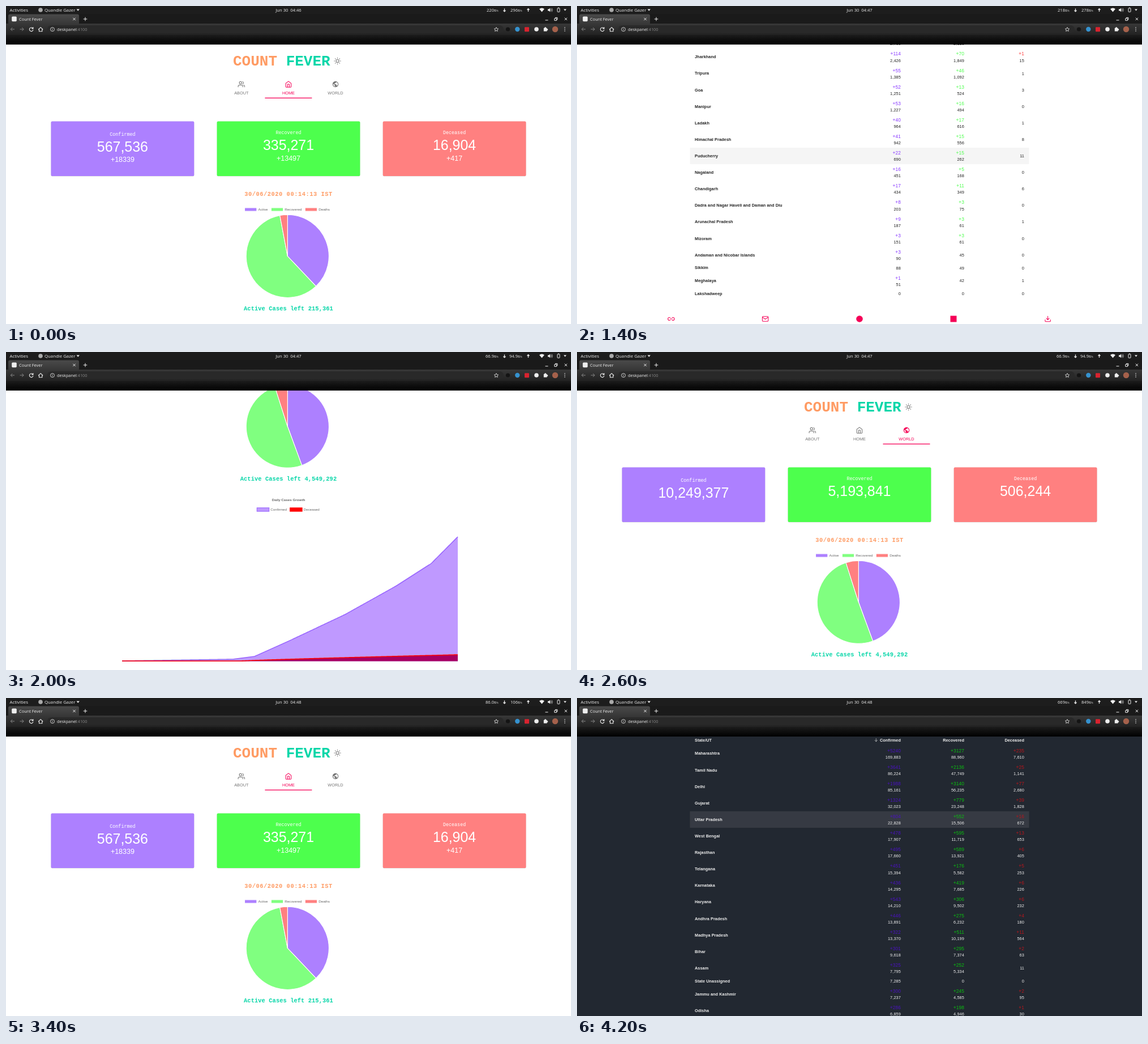
Write an HTML page that moves like this. It is 998 px wide and 561 px high and loops after 4.4 s.

```html
<!DOCTYPE html>
<html lang="en">
<head>
<meta charset="utf-8">
<title>Count Fever</title>
<style>
  html, body { margin: 0; width: 100%; height: 100%; overflow: hidden; background: #fff; }
  svg { display: block; width: 998px; height: 561px; }
  text { white-space: pre; }
  .sans { font-family: "Liberation Sans", Arial, sans-serif; }
  .mono { font-family: "Liberation Mono", monospace; }
  .ui { font-family: "Open Sans", "Noto Sans", sans-serif; }
  .b { font-weight: 700; }
  .body { letter-spacing: .08px; }
  .date { letter-spacing: .52px; }
</style>
</head>
<body>
<svg id="stage" viewBox="0 0 998 561"></svg>
<script>
const STEP = 200, STEPS = 22;
const PINK = '#f50057', ORANGE = '#ff9b63', TEAL = '#06d6a8', GREY = '#666';
const LABELS = ['Confirmed', 'Recovered', 'Deceased'];

const LIGHT = {
  bg: '#fff', ink: '#222', tab: '#757575', hover: '#f5f5f5',
  card: ['#ad80ff', '#4dff4d', '#ff8080'], pie: ['#ad80ff', '#80ff80', '#ff8080'],
  delta: ['#8a3cff', '#4dff4d', '#ff4545'], key: ['#ad80ff', '#80ff80', '#ff8080']
};
const DARK = {
  bg: '#222831', ink: '#eee', tab: '#999', hover: '#363a43',
  card: ['#3d1399', '#0bc00f', '#8f1518'], pie: ['#3d1399', '#12a016', '#a31418'],
  delta: ['#4a12c0', '#0bc010', '#b8161c'], key: ['#3d1399', '#0bb00f', '#a31418']
};

const ICON = {
  users: 'M17 21v-2a4 4 0 0 0-4-4H5a4 4 0 0 0-4 4v2M23 21v-2a4 4 0 0 0-3-3.87M16 3.13a4 4 0 0 1 0 7.75M5 7a4 4 0 1 0 8 0a4 4 0 1 0-8 0',
  home: 'M3 9l9-7 9 7v11a2 2 0 0 1-2 2H5a2 2 0 0 1-2-2zM9 22V12h6v10',
  link: 'M15 7h3a5 5 0 0 1 0 10h-3m-6 0H6a5 5 0 0 1 0-10h3M8 12h8',
  mail: 'M4 4h16a2 2 0 0 1 2 2v12a2 2 0 0 1-2 2H4a2 2 0 0 1-2-2V6a2 2 0 0 1 2-2zM22 6l-10 7L2 6',
  save: 'M21 15v4a2 2 0 0 1-2 2H5a2 2 0 0 1-2-2v-4M7 10l5 5 5-5M12 15V3',
  sun: 'M7 12a5 5 0 1 0 10 0a5 5 0 1 0-10 0M12 1v2M12 21v2M4.2 4.2l1.4 1.4M18.4 18.4l1.4 1.4M1 12h2M21 12h2M4.2 19.8l1.4-1.4M18.4 5.6l1.4-1.4',
  down: 'M12 4v16M5 13l7 7 7-7',
  globe: 'M12 2C6.48 2 2 6.48 2 12s4.48 10 10 10 10-4.48 10-10S17.52 2 12 2zm-1 17.93c-3.95-.49-7-3.85-7-7.93 0-.62.08-1.21.21-1.79L9 15v1c0 1.1.9 2 2 2v1.93zm6.9-2.54c-.26-.81-1-1.39-1.9-1.39h-1v-3c0-.55-.45-1-1-1H8v-2h2c.55 0 1-.45 1-1V7h2c1.1 0 2-.9 2-2v-.41c2.93 1.19 5 4.06 5 7.41 0 2.08-.8 3.97-2.1 5.39z'
};

// A star marks a row with no news today
const STATES = `Maharashtra 169,883 88,960 7,610
Tamil Nadu 86,224 47,749 1,141
Delhi 85,161 56,235 2,680
Gujarat 32,023 23,248 1,828
Uttar Pradesh 22,828 15,506 672
West Bengal 17,907 11,719 653
Rajasthan 17,660 13,921 405
Telangana 15,394 5,582 253
Karnataka 14,295 7,685 226
Haryana 14,210 9,502 232
Andhra Pradesh 13,891 6,232 180
Madhya Pradesh 13,370 10,199 564
Bihar 9,618 7,374 63
Assam 7,795 5,334 11
*State Unassigned 7,285 0 0
Jammu and Kashmir 7,237 4,585 95
Odisha 6,859 4,946 30
Punjab 5,418 3,764 138
Kerala 4,190 2,150 24
Uttarakhand 2,831 2,111 39
Chhattisgarh 2,760 2,130 13
Jharkhand 2,426 1,849 15
Tripura 1,385 1,092 1
Goa 1,251 524 3
Manipur 1,227 494 0
Ladakh 964 616 1
Himachal Pradesh 942 556 8
Puducherry 690 262 11
Nagaland 451 168 0
Chandigarh 434 349 6
Dadra and Nagar Haveli and Daman and Diu 203 75 0
Arunachal Pradesh 187 61 1
Mizoram 151 61 0
Andaman and Nicobar Islands 90 45 0
*Sikkim 88 49 0
Meghalaya 51 42 1
*Lakshadweep 0 0 0`;

// first step, view, scroll there, scroll per step, network down and up
const SCENES = [
  [0, 'home', 0, 196, '220', '296'],
  [3, 'home', 588, 209.25, '469', '177'],
  [7, 'home', 1425, 0, '218', '278'],
  [8, 'home', 0, 0, '218', '278'],
  [9, 'world', 155, 155, '66.9', '94.9'],
  [11, 'world', 0, 0, '66.9', '94.9'],
  [14, 'country', 0, 325, '0', '0'],
  [16, 'country', 0, 0, '0', '0'],
  [17, 'home', 0, 0, '86.0', '106'],
  [18, 'dark', 127, 230.33, '86.0', '106'],
  [21, 'dark', 818, 0, '669', '849']
];

const text = (x, y, str, size, fill, cls = 'sans', anchor = 'start', extra = '') =>
  `<text x="${x}" y="${y}" font-size="${size}" fill="${fill}" class="${cls}" text-anchor="${anchor}" ${extra}>${str}</text>`;
const rect = (x, y, w, h, fill, extra = '') =>
  `<rect x="${x}" y="${y}" width="${w}" height="${h}" fill="${fill}" ${extra}/>`;
const dot = (x, y, r, fill) => `<circle cx="${x}" cy="${y}" r="${r}" fill="${fill}"/>`;
const path = (d, stroke, width = 1, fill = 'none', extra = '') =>
  `<path d="${d}" stroke="${stroke}" stroke-width="${width}" fill="${fill}" ${extra}/>`;
const icon = (name, x, y, color, solid, k = .52) =>
  `<g transform="translate(${x - 12 * k} ${y - 12 * k}) scale(${k})" stroke-linecap="round" stroke-linejoin="round">` +
  path(ICON[name], solid ? 'none' : color, 2, solid ? color : 'none') + '</g>';

const rand = n => { const v = Math.sin(n * 12.9898 + 4.1) * 43758.5453; return v - Math.floor(v); };

// Daily charts: day 0 to 152 across the plot, heights measured up from the baseline
const DAYS = 152, LEFT = 205, WIDTH = 593;
const days = height => Array.from({ length: DAYS + 1 }, (_, d) => [LEFT + d * WIDTH / DAYS, -height(d)]);

function trend(keys, d) {
  const i = Math.max(1, keys.findIndex(k => k[0] >= d));
  const [[d0, h0], [d1, h1]] = [keys[i - 1], keys[i]];
  return h0 + (h1 - h0) * (d - d0) / (d1 - d0);
}
const weekly = d => 1 - .13 * Math.max(0, Math.sin((d - 150) / 7 * 2 * Math.PI));
const noise = (d, amount) => 1 + amount * (rand(d) - .5);

const confirmed = d => weekly(d) * noise(d, .04) *
  trend([[0, 0], [58, 1], [80, 13], [101, 42], [123, 91], [136, 126], [143, 168], [150, 210], [152, 218]], d);
const SPIKES = { 108: 19, 121: 86, 138: 34, 143: 46, 148: 30, 150: 36 };
const recovered = d => (SPIKES[d] || 0) + noise(d, .16) *
  trend([[0, 0], [65, .5], [101, 16], [120, 34], [128, 48], [138, 78], [148, 114], [152, 140]], d);
const deceased = d => (d === 139 ? 17 : 0) + 4 * (d / DAYS) ** 4;
const growth = d => trend([[0, 0], [50, 3], [60, 8], [76, 36], [101, 82], [124, 132], [140, 172], [152, 219]], d);
const losses = d => 11 * Math.max(0, (d - 54) / 98) ** .85;

// Smooth line through [x, y] points
function curve(p) {
  const at = i => p[Math.max(0, Math.min(p.length - 1, i))];
  return p.slice(1).reduce((d, c, i) => {
    const [a, b, e] = [at(i - 1), at(i), at(i + 2)], k = .13;
    return d + `C${b[0] + (c[0] - a[0]) * k} ${b[1] + (c[1] - a[1]) * k} ${c[0] - (e[0] - b[0]) * k} ${c[1] - (e[1] - b[1]) * k} ${c}`;
  }, `M${p[0]}`);
}

function pie(shares, colors) {
  const total = shares.reduce((a, b) => a + b), cx = 497.3, cy = 441.3, r = 73.1;
  const at = a => `${cx + r * Math.sin(a)} ${cy - r * Math.cos(a)}`;
  let a = 0;
  return shares.map((s, i) => {
    const b = a + s / total * 2 * Math.PI;
    const d = `M${cx} ${cy}L${at(a)}A${r} ${r} 0 ${b - a > Math.PI ? 1 : 0} 1 ${at(b)}Z`;
    a = b;
    return path(d, '#fff', 1.1, colors[i], 'stroke-linejoin="bevel"');
  }).join('');
}

const legend = (y, items) => items.map(([x, label, fill, stroke]) =>
  rect(x, y - 2.7, 21.4, 6.2, fill, `stroke="${stroke}" stroke-width="1.1"`) +
  text(x + 24, y + 2.2, label, 6.24, GREY)).join('');

function header(c, active) {
  const tabs = [['ABOUT', 'users'], ['HOME', 'home'], ['WORLD', 'globe']];
  return text(401, 104.5, `<tspan fill="${ORANGE}">COUNT</tspan> <tspan fill="${TEAL}">FEVER</tspan>`, 26, TEAL, 'mono b') +
    icon('sun', 585.5, 97, c.tab) +
    tabs.map(([label, pic], i) => {
      const x = 415.8 + i * 83.1, color = i === active ? PINK : c.tab;
      return icon(pic, x, 138, color, pic === 'globe') + text(x, 156.1, label, 7.35, color, 'sans', 'middle');
    }).join('') + rect(374.3 + active * 83.1, 161.7, 83, 1.3, PINK);
}

const cards = (c, values, deltas) => LABELS.map((label, i) => {
  const x = 79.5 + i * 293.1, mid = x + 126.4, dy = i ? 0 : 2.5;
  return rect(x, 203.8, 252.8, 96.6, 'rgba(0,0,0,.18)', 'rx="2"') + rect(x, 203.4, 252.8, 96.6, c.card[i], 'rx="2"') +
    text(mid, 226.3 + dy, label, 8.4, '#fff', 'mono', 'middle') +
    text(mid, 254.2 + dy, values[i], 24.96, '#fff', 'sans', 'middle') +
    text(mid, 272.5 + dy, deltas ? deltas[i] : '', 12.48, '#fff', 'sans', 'middle');
}).join('');

const summary = (c, shares) =>
  text(499, 334.9, '30/06/2020 00:14:13 IST', 10.4, ORANGE, 'mono b date', 'middle') +
  legend(358.6, [[421.5, 'Active', c.pie[0], '#fff'], [468.3, 'Recovered', c.pie[1], '#fff'], [528.2, 'Deaths', c.pie[2], '#fff']]) +
  pie(shares, c.pie) +
  text(499, 536.6, 'Active Cases left ' + shares[0].toLocaleString('en-US'), 10.4, TEAL, 'mono b body', 'middle');

const chartTitle = str => text(499, 573.2, str, 6.24, GREY, 'sans b', 'middle');
const footer = y => icon('link', 166.3, y, PINK) + icon('mail', 332.6, y, PINK) + dot(499, y, 5.8, PINK) +
  rect(659.5, y - 5.5, 11, 11, PINK) + icon('save', 831.6, y, PINK);

// Daily change as a share of the total; small totals show none
const COLS = [572, 684, 790], RATE = [.034, .04, .025], LEAST = [50, 50, 15];
const rows = [];
STATES.split('\n').reduce((top, line, n) => {
  const words = line.split(' '), values = words.splice(-3);
  const quiet = line[0] === '*', name = words.join(' ').replace('*', '');
  const deltas = values.map((v, i) => {
    const total = +v.replace(',', '');
    return quiet || total < LEAST[i] ? '' : '+' + Math.max(1, Math.round(total * RATE[i] * (.6 + .8 * rand(n * 3 + i))));
  });
  const h = quiet ? 16.64 : 29.11;
  rows.push({ name, values, deltas, top, h });
  return top + h;
}, 901.4);

function table(c) {
  const head = text(208, 894.8, 'State/UT', 7.28, c.ink, 'sans b body') + icon('down', 528.3, 892.2, c.ink, false, .32) +
    LABELS.map((s, i) => text(COLS[i], 894.8, s, 7.28, c.ink, 'sans b body', 'end')).join('');
  return head + rows.map(({ name, values, deltas, top, h }) => {
    const mid = top + h / 2;
    return text(208, mid + 2.5, name, 7.28, c.ink, 'sans b body') + values.map((value, i) =>
      text(COLS[i], mid - 2.3, deltas[i], 8.4, c.delta[i], 'sans body', 'end') +
      text(COLS[i], mid + (deltas[i] ? 8.8 : 2.6), value, 7.4, c.ink, 'sans body', 'end')).join('');
  }).join('');
}

function home(c) {
  const line = (height, color) =>
    path(curve(days(height)), color, 1.56, 'none', 'transform="translate(0 856.5)" stroke-linejoin="round"');
  return header(c, 1) + cards(c, ['567,536', '335,271', '16,904'], ['+18339', '+13497', '+417']) +
    summary(c, [215361, 335271, 16904]) + chartTitle('Daily Cases Timeline') +
    legend(588.3, [[413, LABELS[0], c.key[0], 'rgba(66,0,255,.5)'], [471.7, LABELS[1], c.key[1], 'rgba(0,255,0,.5)'],
      [531.7, LABELS[2], c.key[2], 'rgba(255,0,0,.5)']]) +
    line(deceased, 'rgba(255,0,0,.55)') + line(recovered, 'rgba(0,255,0,.55)') + line(confirmed, 'rgba(66,0,255,.55)') +
    '<rect class="hover" x="199.5" width="599"/>' + table(c) + footer(1977);
}

function world(c) {
  const area = (height, fill, stroke) => {
    const d = curve(days(height));
    return path(d + 'V.5H205Z', 'none', 0, fill) + path(d, stroke, 1.56);
  };
  return header(c, 2) + cards(c, ['10,249,377', '5,193,841', '506,244']) +
    summary(c, [4549292, 5193841, 506244]) + chartTitle('Daily Cases Growth') +
    legend(587.6, [[443.3, LABELS[0], '#bf99ff', '#9966ff'], [501.7, LABELS[2], '#f00', '#f00']]) +
    `<g transform="translate(0 855)">${area(growth, '#bf99ff', '#9966ff')}${area(losses, '#a80063', '#f00')}</g>` + footer(877);
}

function country(c) {
  const base = 844.5, unit = 33.2, counts = [7767, 7008, 104];
  let axis = '';
  for (let i = 0; i <= 8; i++) {
    const y = base - i * unit;
    axis += text(217, y + 2.2, i * 1000, 6.24, GREY, 'sans', 'end') + rect(218, y - .25, 4, .5, '#ddd');
  }
  for (let i = 0; i < 4; i++) axis += rect(221.5 + i * 191.8, base, .6, 5, '#ccc');
  const bars = LABELS.map((label, i) => {
    const x = 248.4 + i * 191.7, h = counts[i] / 1000 * unit;
    return rect(x, base - h, 138.2, h, c.pie[i]) + text(x + 69, 855.3, label, 6.24, GREY, 'sans', 'middle');
  }).join('');
  return '<g transform="translate(-6.2 0)">' + header(c, 2) + cards(c, counts.map(n => n.toLocaleString('en-US'))) +
    summary(c, [655, 7008, 104]) + chartTitle('Current status in Australia') + axis + bars + footer(877) + '</g>';
}

function browser() {
  const white = '#eee', dim = '#888';
  const fade = (id, a, b) => `<linearGradient id="${id}" x2="0" y2="1"><stop stop-color="${a}"/><stop offset="1" stop-color="${b}"/></linearGradient>`;
  return `<defs>${fade('tabFill', '#4a4a4a', '#383838')}${fade('bar', '#383838', '#222')}${fade('shade', '#1c1c1c', '#000')}</defs>` +
    rect(0, 0, 998, 14, '#1d1d1d') + rect(0, 14, 998, 17, '#1a1a1a') +
    path('M4 31V17.5q0-3 3-3H126q3 0 3 3V31z', 'none', 0, 'url(#tabFill)') +
    rect(0, 31, 998, 20, 'url(#bar)') + rect(0, 51, 998, 17, 'url(#shade)') +
    rect(73, 34.3, 806, 13.4, '#292929', 'rx="6.7"') +
    text(6.5, 9.8, 'Activities', 7.9, white, 'ui') + dot(61, 7, 3.8, '#aaa') +
    text(68, 9.8, 'Quandle Gazer', 7.8, white, 'ui') + path('M124.5 5.5h5.4l-2.7 3.2z', 'none', 0, white) +
    text(499, 9.5, '', 7.6, white, 'ui', 'middle', 'id="clock"') +
    ['down', 'up'].map((id, i) => text(862 + 42 * i, 10.3, '', 7.6, white, 'ui', 'end', `id="${id}"`) +
      text(862.3 + 42 * i, 9.8, 'B/s', 5, white, 'ui')).join('') +
    path('M880.5 4.5v5M878.5 7.8l2 2 2-2M922.5 10v-5M920.5 6.7l2-2 2 2', white, 1.3) +
    path('M942 5.2q4.5-3.6 9 0L946.5 10.6z', 'none', 0, white) +
    path('M957 5.6h2l2.3-2.2v7.2L959 8.4h-2z', 'none', 0, white) + path('M962.6 5q1.5 2 0 4M964 3.7q2.6 3.3 0 6.6', white, .7) +
    rect(974, 3.8, 4, 6.6, 'none', `stroke="${white}" rx=".6"`) + rect(975, 2.7, 2, 1, white) + path('M985 5.6h5l-2.5 3z', 'none', 0, white) +
    rect(10.2, 18.6, 8.6, 8.6, white, 'rx="1.6"') + text(23, 25.6, 'Count Fever', 7.4, white, 'ui') +
    path('M118.3 20.8l4.4 4.4m0-4.4l-4.4 4.4M140 19.7v6.6M136.7 23h6.6', white, 1) +
    path('M952.5 25h5M986.7 20.7l4.4 4.4m0-4.4l-4.4 4.4M968.8 22h3.8v3.6h-3.8zM970.3 21.8v-1.4h3.6v3.6h-1.2', white, 1) +
    path('M15 41H8.3m3-3l-3 3 3 3M24.5 41h6.7m-3-3l3 3-3 3', dim, 1) +
    path('M47.2 39.2A3.3 3.3 0 1 0 47.9 41.8M48 37.3v2.6h-2.7', white, 1.1) +
    path('M57.2 41.5l4-3.8 4 3.8M58.5 41v3.8h5.4V41', white, 1.1) +
    path('M78.5 41.2a3.5 3.5 0 1 0 7 0a3.5 3.5 0 1 0-7 0M82 40.7v2.3M82 39v.9', white, .8) +
    text(90, 43.7, `deskpanel<tspan fill="${dim}">:4100</tspan>`, 7.3, white, 'ui') +
    path('M866 37.6l1.1 2.3 2.5.3-1.8 1.8.5 2.5-2.3-1.2-2.3 1.2.5-2.5-1.8-1.8 2.5-.3z', white, .8) +
    dot(886.5, 41, 3.6, '#141414') + dot(903.3, 41, 4.2, '#3592cf') + rect(916, 37.2, 8, 8, '#d8232f', 'rx="1"') +
    dot(937, 41, 3.8, white) + rect(949.8, 38.8, 5.8, 5.8, white) + dot(952.7, 38.6, 1.4, white) + dot(955.9, 41.7, 1.4, white) +
    dot(970, 41, 5.2, '#a5614b') + [38, 41, 44].map(y => dot(987, y, .8, white)).join('');
}

const VIEWS = { home: [home, LIGHT], world: [world, LIGHT], country: [country, LIGHT], dark: [home, DARK] };
const POINTER = { home: 264, dark: 214 };
const stage = document.getElementById('stage');
stage.innerHTML = '<rect id="bg" width="998" height="561"/>' +
  Object.entries(VIEWS).map(([id, [draw, c]]) => `<g id="${id}">${draw(c)}</g>`).join('') + browser();
const $ = id => document.getElementById(id);

function show(n) {
  const [first, view, from, speed, down, up] = SCENES.filter(s => s[0] <= n).pop();
  const scroll = from + speed * (n - first);
  for (const id in VIEWS) $(id).style.display = id === view ? '' : 'none';
  const page = $(view), colors = VIEWS[view][1], hover = page.querySelector('.hover');
  page.setAttribute('transform', `translate(0 ${-scroll})`);
  $('bg').setAttribute('fill', colors.bg);
  if (hover) {
    const y = POINTER[view] + scroll;
    const row = rows.find(r => y >= r.top && y < r.top + r.h);
    hover.setAttribute('y', row ? row.top : 0);
    hover.setAttribute('height', row ? row.h : 0);
    hover.setAttribute('fill', colors.hover);
  }
  $('down').textContent = down;
  $('up').textContent = up;
  $('clock').textContent = 'Jun 30  04:4' + (n < 2 ? 6 : n < 14 ? 7 : 8);
}

let last = -1;
const start = performance.now();
function tick() {
  const n = Math.floor((performance.now() - start) / STEP) % STEPS;
  if (n !== last) show(last = n);
  requestAnimationFrame(tick);
}
tick();
</script>
</body>
</html>
```
